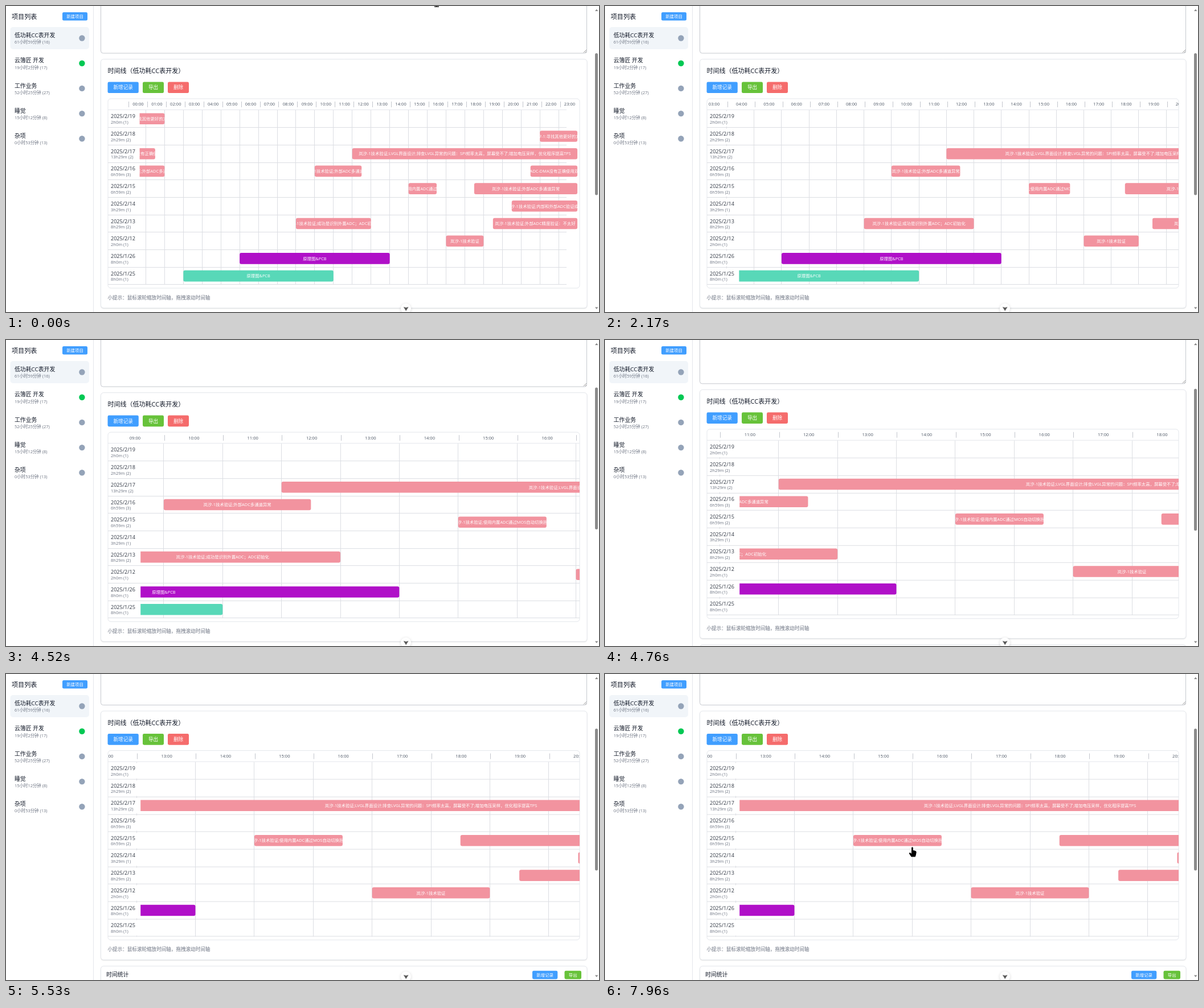
Recreate the animation shown at these times as an HTML page with a canvas. Size 1041 px wide and 538 px high, loop 8000 ms.

```html
<!DOCTYPE html>
<html lang="zh-CN">
<head>
<meta charset="utf-8">
<title>时间线</title>
<style>
html, body { margin: 0; width: 100%; height: 100%; overflow: hidden; background: #fff; }
canvas { display: block; width: 1041px; height: 538px; }
</style>
</head>
<body>
<canvas id="stage"></canvas>
<script>
const W = 1041, H = 538, LOOP = 8000, TICK = 40;
const FONT = '"Open Sans", "Noto Sans CJK SC", "Noto Sans CJK", "Noto Sans", sans-serif';
const BLUE = '#409eff', GREEN = '#67c23a', RED = '#f56c6c';
const PINK = '#f2939f', PURPLE = '#b010c8', TEAL = '#58d8b8';
const LINE = '#dcdee3', SOFT = '#e4e7ec', DARK = '#111827', GREY = '#6b7280';

const canvas = document.getElementById('stage');
const c = canvas.getContext('2d');
const dpr = window.devicePixelRatio || 1;
canvas.width = W * dpr;
canvas.height = H * dpr;

const projects = [
  ['低功耗CC表开发', '61小时59分钟 (16)'],
  ['云簿匠 开发', '19小时2分钟 (17)'],
  ['工作业务', '52小时25分钟 (27)'],
  ['睡觉', '15小时12分钟 (8)'],
  ['杂项', '0小时53分钟 (13)'],
];

const CODE = '岚汐-1', TEST = CODE + '技术验证';
const SEARCH = CODE + ':寻找其他更好的方案';
const BUFFER = CODE + ':ADC-DMA没有正确使用双缓冲区';
const CHANNEL = TEST + ';外部ADC多通道异常';

// Each bar: start hour, end hour, caption, colour
const days = [
  ['2025/2/19', '2h0m (1)', [0, 2, SEARCH]],
  ['2025/2/18', '2h29m (2)', [22, 24, SEARCH]],
  ['2025/2/17', '13h29m (2)', [0, 1.5, BUFFER],
    [12, 24, TEST + ';LVGL界面设计;排查LVGL异常的问题：SPI频率太高，屏幕受不了;增加电压采样，优化程序提高TPS']],
  ['2025/2/16', '6h59m (3)', [0, 2, CHANNEL], [10, 12.5, CHANNEL], [21.5, 24, BUFFER]],
  ['2025/2/15', '6h59m (2)', [15, 16.5, TEST + ';使用内置ADC通过MOS自动切换挡位'], [18.5, 24, CHANNEL]],
  ['2025/2/14', '3h29m (1)', [20.5, 24, TEST + ';内部和外部ADC验证成功']],
  ['2025/2/13', '8h29m (2)', [9, 13, TEST + ';成功是识别外置ADC；ADC初始化'],
    [19.5, 24, TEST + ';外部ADC精度验证：不太好']],
  ['2025/2/12', '2h0m (1)', [17, 19, TEST]],
  ['2025/1/26', '8h0m (1)', [6, 14, '原理图&PCB', PURPLE]],
  ['2025/1/25', '8h0m (1)', [3, 11, '原理图&PCB', TEAL]],
];

const zooms = [1390, 1720, 1970, 2170, 2960, 3000, 3080, 3120, 3200, 3280, 3690, 3730];
// Drags: start time, steps, final x of midnight, final page scroll
const drags = [[4520, 7, -935.8, 6.2], [5130, 5, -1087.5, 14.5], [5370, 5, -1114.8, 28.4]];

const steps = (t, start, n) => Math.max(0, Math.min(n, Math.floor((t - start) / TICK) + 1)) / n;

function view(t) {
  let scale = 32.94, x = 212.5, scroll = 0;
  zooms.forEach((at, i) => {
    if (t < at) return;
    const pivot = i < 4 ? 626 : 644;
    x = pivot - (pivot - x) * 1.1;
    scale *= 1.1;
  });
  for (const [start, n, toX, toScroll] of drags) {
    const k = steps(t, start, n);
    x += (toX - x) * k * (2 - k);
    scroll += (toScroll - scroll) * k;
  }
  return { scale, x, scroll };
}

function text(s, x, y, size, color = DARK, align = 'left', weight = 400) {
  c.font = `${weight} ${size}px ${FONT}`;
  c.fillStyle = color;
  c.textAlign = align;
  c.fillText(s, x, y + size * 0.37);
}

function box(x, y, w, h, r, fill, stroke) {
  c.beginPath();
  c.roundRect(x, y, w, h, r);
  if (fill) { c.fillStyle = fill; c.fill(); }
  if (stroke) { c.strokeStyle = stroke; c.lineWidth = 1; c.stroke(); }
}

function rect(x, y, w, h, fill) {
  c.fillStyle = fill;
  c.fillRect(x, y, w, h);
}

function clipped(x, y, w, h, draw) {
  c.save();
  c.beginPath();
  c.rect(x, y, w, h);
  c.clip();
  draw();
  c.restore();
}

function shadowed(blur, draw) {
  c.save();
  c.shadowColor = 'rgba(0,0,0,.16)';
  c.shadowBlur = blur * dpr;
  c.shadowOffsetY = dpr;
  draw();
  c.restore();
}

function button(s, x, y, w, h, color, size) {
  box(x, y, w, h, 2.4, color);
  text(s, x + w / 2, y + h / 2, size, '#fff', 'center', 500);
}

function shape(points, fill, outline) {
  c.beginPath();
  points.forEach(([x, y]) => c.lineTo(x, y));
  c.closePath();
  c.lineJoin = 'round';
  if (outline) { c.strokeStyle = outline; c.lineWidth = 1.5; c.stroke(); }
  c.fillStyle = fill;
  c.fill();
}

function sidebar() {
  text('项目列表', 10, 18.5, 11.1);
  button('新建项目', 99, 11, 44, 14.6, BLUE, 7.4);
  box(7.5, 37, 138.5, 39, 5, '#f1f5f9');
  projects.forEach(([name, spent], i) => {
    const y = 51.5 + 44.2 * i;
    text(name, 15, y, 9.85);
    text(spent, 15, y + 12.2, 7.45, GREY);
    c.beginPath();
    c.arc(133.4, y + 5, 5.2, 0, 7);
    c.fillStyle = i === 1 ? '#00c853' : '#94a3b8';
    c.fill();
  });
  rect(153, 0, 1, H, '#e5e7eb');
}

function timeline({ scale, x: x0 }) {
  const shift = 0.5 + 80 / scale, left = 237.5 - shift;
  const at = hour => x0 + hour * scale;
  const rowEnd = Math.min(1007, at(24) - 19);

  box(179, 163, 828, 333, 5, '#fff', SOFT);
  clipped(179, 163, 828, 333, () => {
    for (let h = 0; h < 24; h++) {
      const x = at(h) + shift;
      rect(Math.round(x - 0.5), 168, 1, 10, '#c3c6cd');
      text(String(h).padStart(2, '0') + ':00', x + scale / 2, 172.6, 7.6, '#4b5563', 'center');
      if (h) rect(Math.round(at(h) - 0.5), 183, 1, 307, LINE);
    }
    rect(179, 182, rowEnd - 179, 1, SOFT);

    days.forEach(([date, total, ...bars], i) => {
      const y = 183 + 30.7 * i;
      rect(180, y + 2, left - 180, 27, '#fff');
      rect(179, Math.round(y + 30.1), rowEnd - 179, 1, LINE);
      text(date, 184, y + 11, 9.05, '#303743');
      text(total, 184, y + 21.3, 7.5, GREY);
      clipped(left, y, 1007 - left, 30, () => {
        for (const [from, to, caption, color = PINK] of bars) {
          const x = at(from), w = at(to) - x;
          box(x, y + 5.5, w, 19.6, 3, color);
          clipped(x, y, w, 30, () => text(caption, x + w / 2, y + 15.3, 7.38, '#fff', 'center'));
        }
      });
    });
  });
}

function page(v) {
  c.save();
  c.translate(0, -v.scroll);

  box(166.5, -60, 853, 143, 4, '#fff', '#c6c9cf');
  c.strokeStyle = '#777';
  c.lineWidth = 0.8;
  c.beginPath();
  c.moveTo(1014, 82); c.lineTo(1019, 77);
  c.moveTo(1017, 82); c.lineTo(1019, 80);
  c.stroke();

  shadowed(2, () => box(166.5, 93.5, 853.5, 437.5, 5, '#fff'));
  box(166.5, 93.5, 853.5, 437.5, 5, null, SOFT);
  text('时间线（低功耗CC表开发）', 178.5, 114.3, 11);
  button('新增记录', 178.5, 133.5, 54.3, 19.6, BLUE, 8.6);
  button('导出', 240, 133.5, 37, 19.6, GREEN, 8.6);
  button('删除', 284, 133.5, 37, 19.6, RED, 8.6);
  timeline(v);
  text('小提示：鼠标滚轮缩放时间轴，拖拽滚动时间轴', 178.5, 512.7, 8.57, GREY);

  shadowed(2, () => box(166.5, 542, 853.5, 200, 5, '#fff'));
  box(166.5, 542, 853.5, 200, 5, null, SOFT);
  text('时间统计', 176, 557.2, 9.85);
  button('新增记录', 924, 550.2, 44.3, 14.6, BLUE, 7.4);
  button('导出', 980.5, 550.2, 29.5, 14.6, GREEN, 7.4);
  c.restore();

  box(1034, 83 + v.scroll * 0.46, 5, 249.5, 2.5, '#8b8b8b');
  shape([[1034, 9], [1039.5, 9], [1036.7, 5.5]], '#8b8b8b');
  shape([[1034, 529.5], [1039.5, 529.5], [1036.7, 533]], '#8b8b8b');

  shadowed(5, () => box(693, 523, 18, 18, 9, '#fff'));
  shape([[697.8, 529], [702.2, 530.2], [706.6, 529], [702.2, 536.2]], '#5a5a5a');
}

function beam(x, y) {
  rect(x - 0.75, y - 7, 1.5, 15, '#111');
  for (const end of [-8, 7.5]) rect(x - 4, y + end, 8, 1.4, '#111');
}

function arrow(x, y) {
  shape([[0, 0], [0, 14], [3.2, 11], [5.3, 15.7], [7.5, 14.7], [5.5, 10.2], [10, 10]]
    .map(([a, b]) => [x + a, y + b]), '#111', '#fff');
}

function hand(x, y) {
  shape([[-1.4, 0], [0, -0.8], [1.3, 0], [1.5, 5], [4.2, 5.4], [6.5, 6.6], [7.2, 8.2], [6.4, 13],
    [5.2, 16.5], [-1.8, 16.5], [-5.6, 10.7], [-5.2, 9.2], [-3.4, 9.3], [-1.6, 11]]
    .map(([a, b]) => [x + a, y + b]), '#000', '#fff');
}

function tooltip() {
  box(543.5, 303.5, 165, 58, 2, '#fff', '#c8c8c8');
  [TEST + ';使用内置ADC通过', 'MOS自动切换挡位', '2025/2/15 15:00 - 16:30', '1h30m']
    .forEach((s, i) => text(s, 549, 312.5 + 13.2 * i, 7.4, '#555'));
}

function pointer(t) {
  if (t < 440) {
    const k = steps(t, 200, 6);
    const x = 756 - 185 * k, y = -7 + 157 * k;
    (y < 80 ? beam : arrow)(x, y);
  } else if (t >= 5900) {
    if (t >= 6520 && t < 7880) tooltip();
    const k = steps(t, 5900, 3), out = steps(t, 7880, 3);
    hand(534 + 4.5 * k + out, 305.5 - 10.5 * k + 10 * out);
  }
}

function draw(now) {
  const t = now % LOOP;
  c.setTransform(dpr, 0, 0, dpr, 0, 0);
  rect(0, 0, W, H, '#fff');
  page(view(t));
  sidebar();
  pointer(t);
}

const begin = performance.now();
function frame() {
  draw(performance.now() - begin);
  requestAnimationFrame(frame);
}
frame();
</script>
</body>
</html>
```
